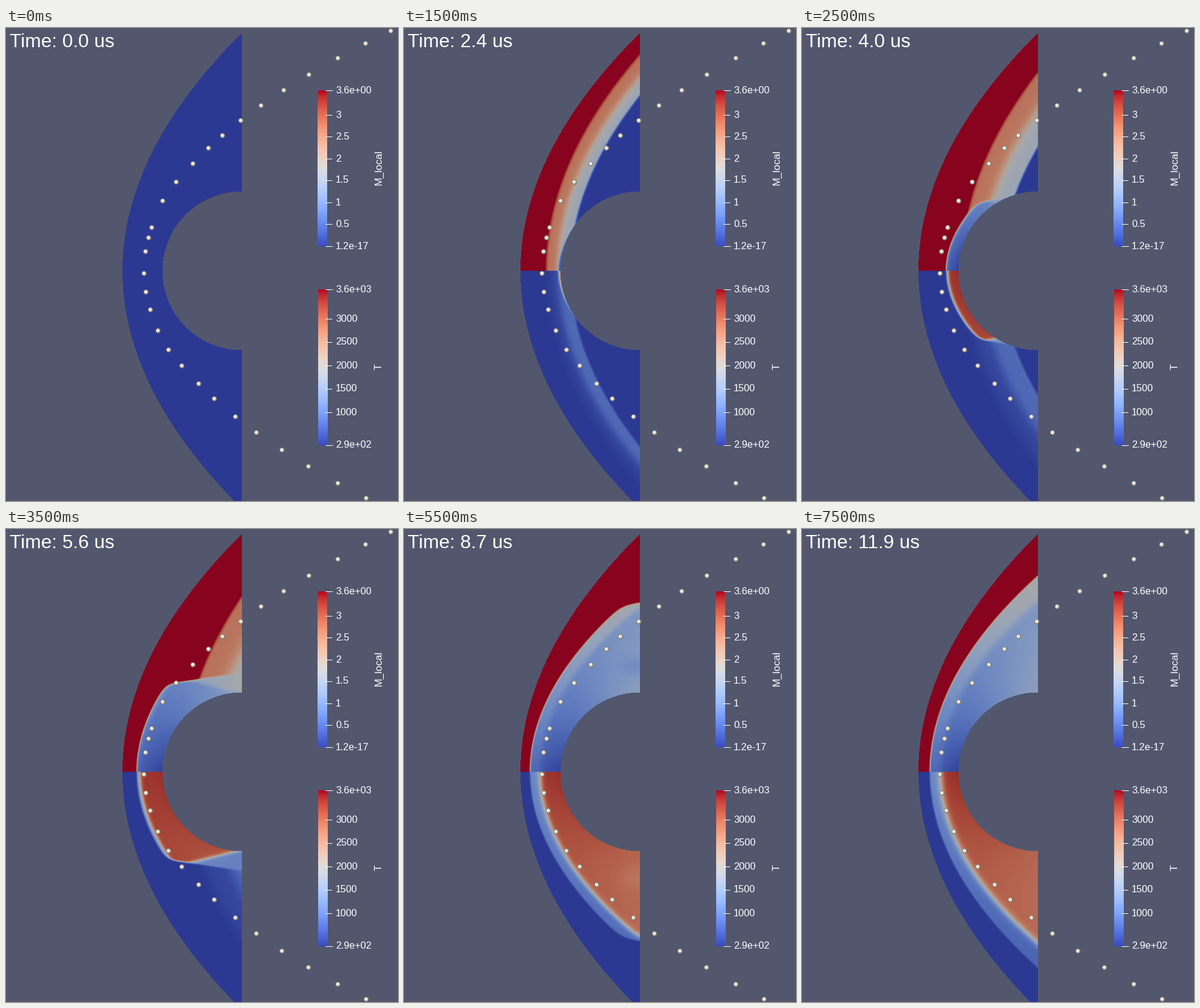
These frames come from a looping animation (653x789 px, 8 s). A matplotlib script:

```python
import numpy as np
import matplotlib.pyplot as plt
from matplotlib.animation import FuncAnimation
from matplotlib.patches import Circle

W, H, DPI = 653, 789, 100
FRAMES, STEP_MS, STEP_US = 16, 500, 0.7935
CX, CY, RAD = 393, 405, 132.5
NOSE, BOW = 194, 0.001263          # outer parabola
FIRST_HIT = 3                      # step at which the wave reaches the body
M_MAX, T_MIN, T_SPAN = 3.56, 290, 3342
SHADE = 0.76                       # lighting on the flow field
CMAP = plt.get_cmap("coolwarm")
PX = 72 / DPI

plt.rcParams["font.family"] = "Liberation Sans"

# Heights of the beads; their x follows from a curve
BEAD_Y = [5, 26, 50.5, 78, 104, 129.5, 154.5, 179.5, 200.5, 226.5, 257, 288.5, 333, 350, 373,
          409.5, 440.5, 470, 505, 537, 563.5, 593.5, 618.5, 648.5, 675, 704, 731.5, 759.5, 784.5]

# Pixel centres of the flow region
X0, Y0 = 193, 8
px, py = np.meshgrid(np.arange(X0, CX) + 0.5, np.arange(Y0, H) + 0.5)
dist = np.abs(py - CY)
r = np.hypot(px - CX, dist)
phi = np.arctan2(dist, CX - px) / (np.pi / 2)
upper = py < CY
inside = (px > NOSE + BOW * dist ** 2) & (r > RAD)


def step(v, w):
    return 0.5 + 0.5 * np.tanh(v / w)


def mix(a, b, t):
    return a + (b - a) * t


def smooth_min(a, b, w):
    return -w * np.logaddexp(-a / w, -b / w)


def behind(nose, c):
    """Distance behind the parabola x = nose + c * d**2."""
    return (px - nose - c * dist ** 2) / np.hypot(1, 2 * c * dist)


def incident(k):
    """Plane wave travelling right: three parabolic fronts."""
    tail = behind(NOSE + 14.4 * k, max(0.00115, 0.00126 - 0.00002 * k))
    mid = behind(NOSE + 21 * k, 0.0013)
    head = behind(NOSE + 27.6 * k, 0.00126 + 0.00003 * k)
    a, b, still = step(tail, 2.5), step(mid, 2 + 1.4 * k), step(head, 1.6)
    mach = mix(mix(3.75, 2.68, a), 1.6, b) * (1 - still)
    temp = T_MIN + (110 * step(tail - 6, 8) + 400 * b) * (1 - still)
    return mach, temp


def fronts(k):
    """Depth behind the bow shock and behind the hot contact surface."""
    n = k - 5
    nose = 210 + 47 * np.exp(-((k - 3) / 3) ** 2) + 0.75 * max(k - 11, 0)
    gap = 10.5 + 7.5 * np.tanh((k - 8.7) / 2)
    c = np.interp(k, [3, 5, 7, 15], [0.0048, 0.004, 0.0023, 0.00168])
    reach = 119 + 13.7 * n + 1.95 * n ** 2
    tilt = np.interp(k, [7, 9], [-0.25, 0.15])
    shock = smooth_min(behind(nose, c), reach + 0.15 * (px - 320) - dist, 5)
    contact = smooth_min(behind(nose + gap, c + 0.00003 * max(n, 0)),
                         reach - 6 + tilt * (px - 320) - dist, 4)
    return shock, contact


def layer(k):
    """Flow between the bow shock and the body."""
    shock, contact = fronts(k)
    height = np.maximum(r - RAD, 0)
    q = height / (height + np.maximum(shock, 0) + 1)
    bx = np.interp(k, [9, 11], [366, 386])
    blob = np.exp(-((px - bx) / 24) ** 2 - ((dist - 175) / 19) ** 2)
    blob *= np.interp(k, [7, 9, 11, 14], [0, 1, 0.45, 0])
    m_in = 0.1 + 1.27 * phi + 0.35 * q * (1 - phi) - 0.25 * q * phi - 0.55 * blob
    m_out = 0.5 + 1.25 * phi
    t_in = 3430 - 480 * phi * np.interp(k, [5, 11], [0.5, 1]) - 200 * q * (1 - q) - 280 * blob
    t_out = (np.interp(k, [3, 5, 9], [1700, 1380, 1150])
             - 430 * phi * np.interp(k, [5, 13], [0.3, 1]))
    hot = step(contact, np.interp(k, [5, 15], [2.5, 6]))
    return mix(m_out, m_in, hot), mix(t_out, t_in, hot), step(shock, 1.2)


def field(k):
    mach, temp = np.zeros_like(px), np.full_like(px, T_MIN)
    if k:
        mach, temp = incident(k)
    if k >= FIRST_HIT:
        m, t, s = layer(k)
        mach, temp = mix(mach, m, s), mix(temp, t, s)
    rgba = CMAP(np.where(upper, mach / M_MAX, (temp - T_MIN) / T_SPAN))
    rgba[..., :3] *= SHADE
    rgba[..., 3] = inside
    return rgba


def bar(left, top, ticks, title, title_y):
    height = 260
    ax.imshow(np.linspace(1, 0, 256)[:, None], cmap=CMAP, aspect="auto",
              extent=(left, left + 16, top + height, top), interpolation="nearest")
    for pos, label in ticks:
        y = round(top + height * (1 - pos)) - 0.5
        pad = 0.5 if pos in (0, 1) else 0
        ax.plot([532 - pad, 543 + pad], [y, y], color="white", lw=PX, solid_capstyle="butt")
        ax.text(549, y + 5, label, color="white", size=16.4 * PX, va="baseline")
    ax.text(621, title_y, title, color="white", size=17 * PX, rotation=90,
            ha="center", va="center")


def bead(y):
    d = abs(y - CY)
    x = 230 + 0.00257 * d ** 2 - 4 * np.exp(-((d - 125) / 35) ** 2)
    for lift, rad, col in ((0, 4.2, "#6f6d66"), (0.2, 3.5, "#bdb8aa"), (0.4, 2.2, "#f6f3ea")):
        ax.add_patch(Circle((x - lift, y - lift), rad, fc=col, ec="none", zorder=4))


fig = plt.figure(figsize=(W / DPI, H / DPI), dpi=DPI, facecolor=(0.32, 0.34, 0.43))
ax = fig.add_axes([0, 0, 1, 1])
ax.axis("off")

flow = ax.imshow(field(0), extent=(X0, CX, H, Y0), interpolation="nearest")
bar(519, 104, [(0, "1.2e-17"), (1, "3.6e+00")]
    + [(v / M_MAX, f"{v:g}") for v in np.arange(0.5, 3.1, 0.5)], "M_local", 233)
bar(520, 436, [(0, "2.9e+02"), (1, "3.6e+03")]
    + [((v - T_MIN) / T_SPAN, str(v)) for v in range(1000, 3001, 500)], "T", 565)
for y in BEAD_Y:
    bead(y)

clock = ax.text(5.5, 31.5, "", color="white", size=32 * PX, va="baseline")
ax.set_xlim(0, W)
ax.set_ylim(H, 0)
ax.set_aspect("auto")


def update(k):
    flow.set_data(field(k))
    clock.set_text(f"Time: {k * STEP_US:.1f} us")
    return flow, clock


anim = FuncAnimation(fig, update, frames=FRAMES, interval=STEP_MS, repeat=True,
                     repeat_delay=0)
plt.show()
```
